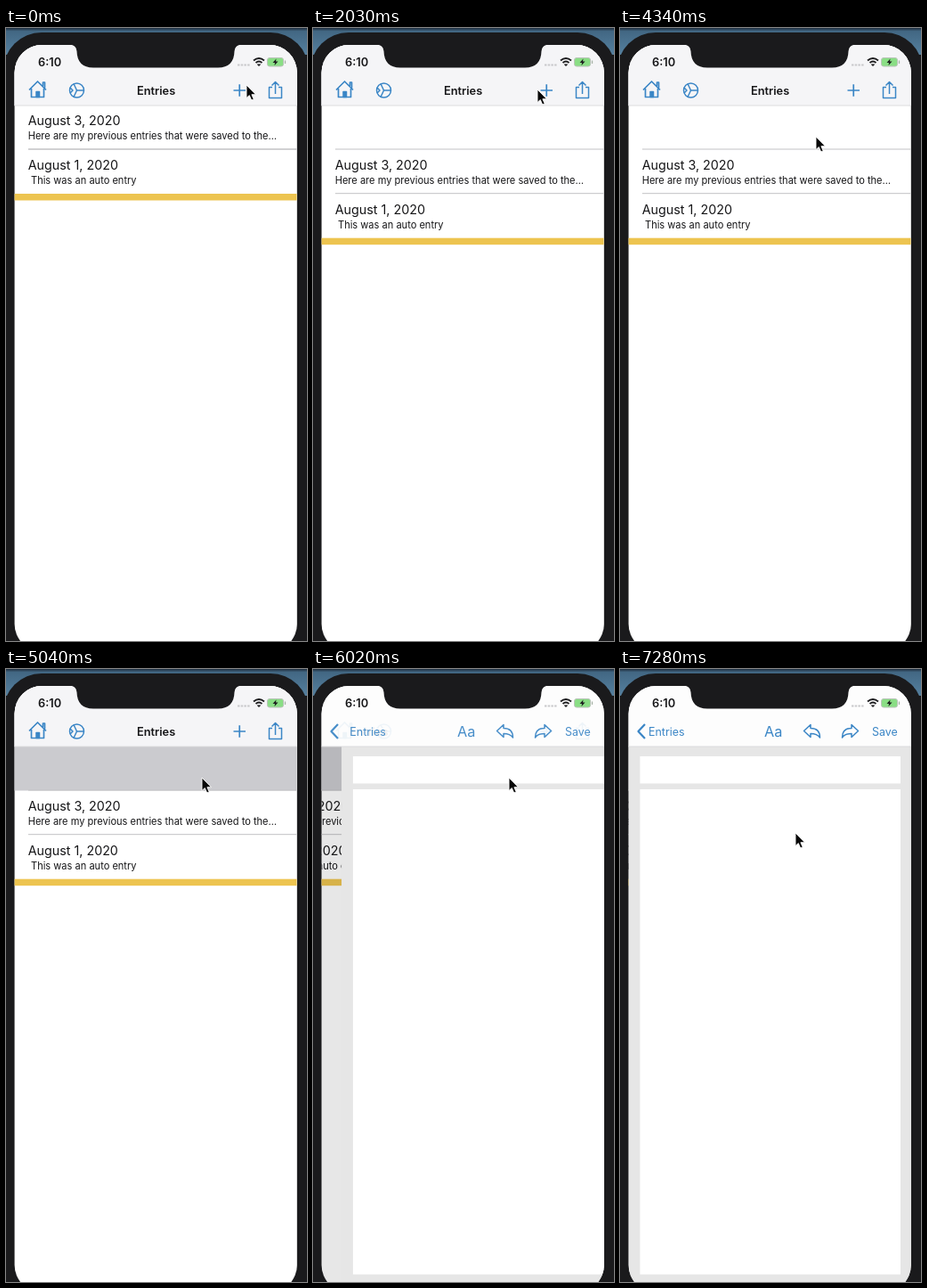
An HTML page for the animation above (7.42 s loop, 338x688 px).

```html
<!DOCTYPE html>
<html lang="en">
<head>
<meta charset="utf-8">
<style>
html, body { margin: 0; width: 100%; height: 100%; overflow: hidden; background: #1a1a1c; }
svg { display: block; width: 338px; height: 688px; font-family: Inter, sans-serif; filter: blur(.4px); }
text { fill: #161618; }
.day { font-size: 14.3px; }
.note { font-size: 11.07px; }
.nav { font-size: 12.45px; }
.bold { font-weight: 600; }
.blue { fill: #3b86c6; }
.icon { fill: none; stroke: #3b86c6; stroke-width: 1.5; stroke-linejoin: round; }
.rule { stroke: #c2c2c4; }
</style>
</head>
<body>
<svg viewBox="0 0 338 688">
  <defs>
    <linearGradient id="desk" x2="0" y2="1">
      <stop stop-color="#1d2c3c"/><stop offset=".12" stop-color="#426783"/><stop offset="1" stop-color="#55809f"/>
    </linearGradient>
    <clipPath id="screen"><rect x="9.600" y="19" width="317.200" height="681" rx="31"/></clipPath>
    <path id="arrow" d="M206.500 69.500L214 62.500V66.500C221 66.500 224.500 70 224.500 77C222 73.500 219 72.500 214 72.500V76.500Z"/>
  </defs>

  <rect width="338" height="30" fill="url(#desk)"/>
  <rect x="-3" y="5" width="343" height="730" rx="43" fill="#1a1a1c"/>

  <g clip-path="url(#screen)">
    <rect x="9" y="19" width="318" height="669" fill="#fff"/>

    <g id="list">
      <rect id="selection" x="9" y="87" width="318" height="49.500" fill="#cbcbcf"/>
      <path class="rule" d="M25 136H327"/>
      <g id="rows">
        <text class="day" x="24.700" y="109">August 3, 2020</text>
        <text class="note" x="24.700" y="125">Here are my previous entries that were saved to the…</text>
        <path class="rule" d="M25 136H327"/>
        <text class="day" x="24.700" y="159">August 1, 2020</text>
        <text class="note" x="28" y="175">This was an auto entry</text>
        <rect x="9" y="186" width="318" height="7.500" fill="#edc450"/>
      </g>
    </g>
    <rect id="dim" x="9" y="87" width="318" height="601"/>

    <g id="editor">
      <rect x="9.600" y="87" width="318" height="612" fill="#e6e6e6"/>
      <path d="M22.500 98H315V128.500H22.500ZM22.500 135H315V679.500H22.500Z" fill="#fff"/>
    </g>

    <rect x="9" y="19" width="318" height="68" fill="#fdfdfd"/>
    <rect id="tint" x="9" y="19" width="318" height="68" fill="#f5f5f7"/>
    <path d="M9 87H327" stroke="#dcdcde"/>

    <g id="listNav" class="icon">
      <path d="M26 69.500L35.500 60L45 69.500M28.500 68V77.500H42.500V68M41.500 65V61H43.500V68" stroke-width="1.700"/>
      <path d="M34 77.500V71.500H37.500V77.500Z" fill="#3b86c6"/>
      <circle cx="79.500" cy="70" r="8"/>
      <path d="M76 62.500L79.500 70L76 77.500M79.500 70H87.500M72 67L75 70L72 73"/>
      <path id="plus" d="M255.500 70H269M262.250 63.250V76.750" stroke-width="1.700"/>
      <path d="M299 66.500H295.500V78.500H309.500V66.500H306M302.500 74V61M298.500 64.500L302.500 60.500L306.500 64.500"/>
    </g>
    <g id="editorNav">
      <path class="icon" d="M28 62L20.500 70L28 78" style="stroke-width:2.200"/>
      <text class="blue" x="162" y="75.500" font-size="16.300">Aa</text>
      <use href="#arrow" class="icon"/>
      <use href="#arrow" class="icon" transform="translate(474) scale(-1 1)"/>
      <text class="blue" x="283" y="74.500" font-size="12.450">Save</text>
    </g>
    <g id="title">
      <text id="titleBold" class="bold" y="74.500" font-size="12.800">Entries</text>
      <text id="titleBlue" class="nav blue" y="74.500">Entries</text>
    </g>

    <text class="bold" x="36" y="42.500" font-size="12.800">6:10</text>
    <path d="M260 41.500H274" stroke="#c9c9cc" stroke-width="2" stroke-dasharray="2.500 1.200"/>
    <g fill="none" stroke="#1c1c1e" stroke-width="1.800">
      <path d="M278 36.500Q284 31.500 290 36.500M280.500 39Q284 36 287.500 39"/>
      <path d="M282.500 40.500L284 42L285.500 40.500" stroke-width="1.500"/>
    </g>
    <rect x="293.500" y="33.500" width="18" height="9.500" rx="2.500" fill="#8ade85" stroke="#b9c4b9"/>
    <path d="M313.500 36.500V40" stroke="#a9b4a9" stroke-width="1.300"/>
    <path d="M303.500 34.500L299.500 39H302L301.500 42L305.500 37.500H303Z" fill="#1c1c1e"/>
    <path d="M71 18.500Q79 19 79.500 26Q80 44.500 98 44.500H238Q256 44.500 256.500 26Q257 19 265 18.500Z" fill="#1a1a1c"/>
  </g>

  <path id="pointer" d="M0 0V14.500L3.300 11.600L5.700 17L8.200 15.900L5.900 10.700H10.500Z" fill="#080808" stroke="#fff" stroke-width=".9"/>
</svg>

<script>
const LOOP = 7420, STEP = 70, WIDTH = 317;
const el = Object.fromEntries([...document.querySelectorAll('[id]')].map(e => [e.id, e]));

// Pointer stops: time, x, y
const stops = [
  [0, 270, 64], [980, 252, 69], [2240, 252, 69], [3080, 237, 91], [3360, 237, 91],
  [3780, 220, 122], [6160, 220, 122], [7280, 197, 184], [LOOP, 197, 184]
];

const ramp = (t, from, to) => Math.min(1, Math.max(0, (t - from) / (to - from)));
const smooth = x => x * x * (3 - 2 * x);
const mix = (a, b, k) => a + (b - a) * k;
const move = (e, x, y = 0) => e.setAttribute('transform', `translate(${x.toFixed(2)} ${y.toFixed(2)})`);
const fade = (e, opacity) => e.setAttribute('opacity', opacity.toFixed(3));

// Critically damped spring
function pushProgress(t) {
  const s = Math.max(0, t - 5036) * 0.00439;
  return t > 7000 ? 1 : 1 - (1 + s) * Math.exp(-s);
}

function draw(t) {
  const i = stops.findIndex(s => s[0] > t);
  const [a, b] = [stops[i - 1], stops[i]];
  const k = smooth(ramp(t, a[0], b[0]));
  move(el.pointer, mix(a[1], b[1], k), mix(a[2], b[2], k));

  // Tapping plus inserts an empty row at the top
  fade(el.plus, 1 - 0.8 * (ramp(t, 1050, 1190) - ramp(t, 1400, 1750)));
  move(el.rows, 0, 49.7 * smooth(ramp(t, 1330, 2030)));
  fade(el.selection, t >= 4900 ? 1 : 0);

  // Opening the row pushes the editor over the list
  const p = pushProgress(t);
  move(el.list, -0.3 * WIDTH * p);
  move(el.editor, WIDTH * (1 - p));
  fade(el.dim, 0.1 * p);
  fade(el.tint, 1 - p);
  fade(el.listNav, 1 - p);
  fade(el.editorNav, p);
  move(el.title, mix(147, 32, p ** 1.15));
  fade(el.titleBold, 1 - p);
  fade(el.titleBlue, p);
}

function tick() {
  const t = performance.now() % LOOP;
  draw(Math.floor(t / STEP) * STEP);
  requestAnimationFrame(tick);
}
tick();
</script>
</body>
</html>
```
